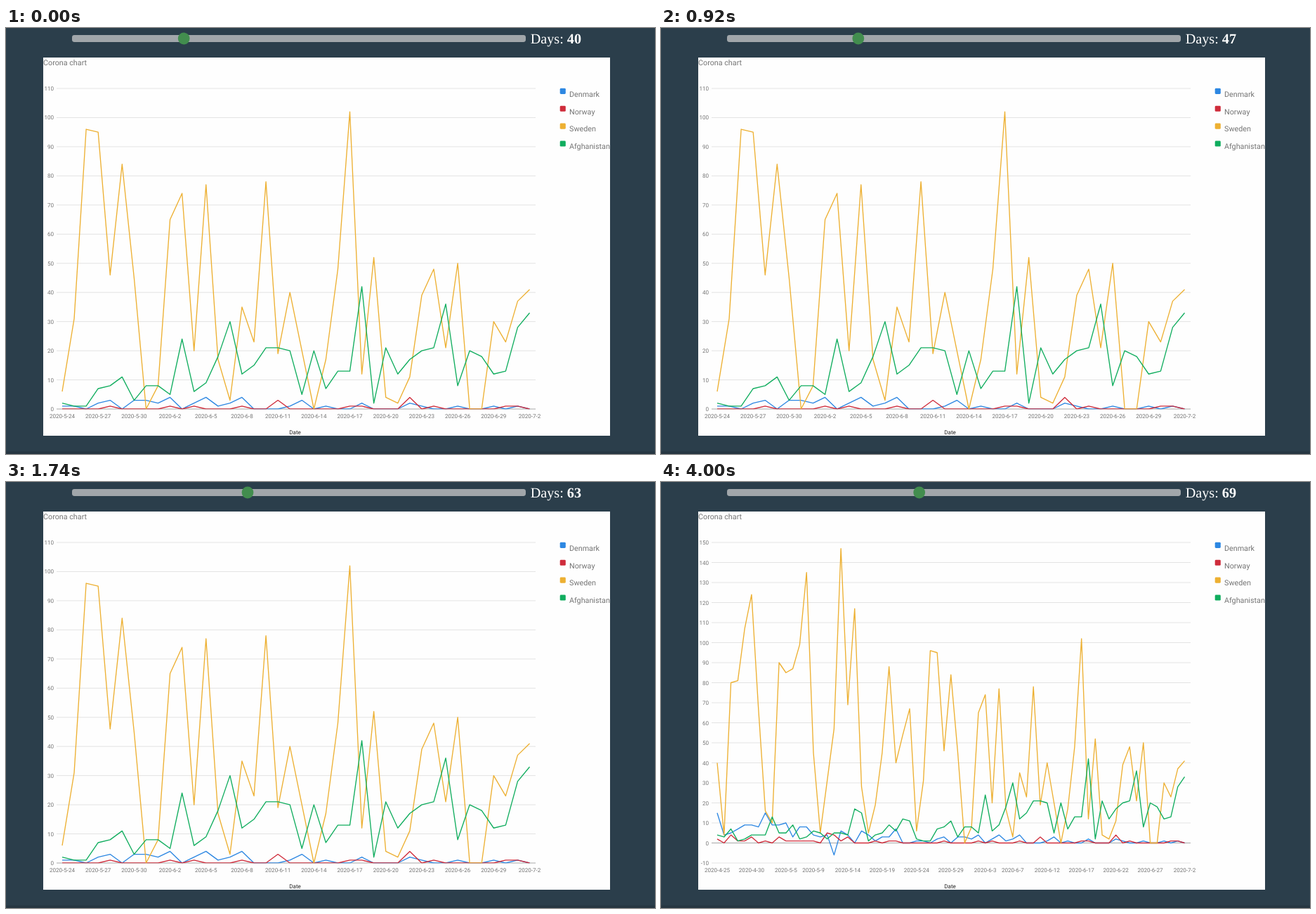
Animation, 924 px wide and 606 px high, one loop 8000 ms. Source, as an HTML page:

```html
<!DOCTYPE html>
<html lang="en">
<head>
<meta charset="utf-8">
<title>Days chart</title>
<style>
  html, body { margin: 0; width: 100%; height: 100%; overflow: hidden; background: #2b3e4b; }
  svg { display: block; width: 924px; height: 606px; }
  text { font-family: Roboto, sans-serif; fill: #757575; text-rendering: geometricPrecision; }
  .big { font-size: 10.76px; }
  .small { font-size: 8.07px; }
  .days { font: 20.2px "Liberation Serif", serif; fill: #fff; }
  .days tspan { font-weight: bold; }
  polyline { fill: none; stroke-width: 1.345; stroke-linejoin: round; }
</style>
</head>
<body>
<svg id="stage" viewBox="0 0 924 606">
  <clipPath id="plot"><rect x="72" y="80" width="682" height="462.3"/></clipPath>
  <clipPath id="panel"><rect x="53" y="42" width="807" height="538"/></clipPath>
  <rect y="602.5" width="924" height="3.5" fill="#263641"/>
  <g opacity=".7">
    <rect x="94" y="10" width="646" height="10" rx="3.4" fill="#d3d3d3"/>
    <circle id="thumb" cy="15" r="8.4" fill="#4caf50"/>
  </g>
  <text class="days" x="746.7" y="21.8">Days: <tspan id="count">40</tspan></text>
</svg>
<script>
const LEFT = 80, RIGHT = 745.5, TOP = 86, BOTTOM = 542;

// Daily values from 2020-4-25 to 2020-7-2
const denmark = [
  15, 4, 5, 7, 9, 9, 8, 15, 9, 9, 10, 3, 8, 8, 4, 3, 4, -6, 6, 4, 0, 6, 4, 1, 3, 3, 7, 0, 0,
  1, 1, 0, 2, 3, 0, 3, 3, 2, 4, 0, 2, 4, 1, 2, 4, 0, 0, 0, 1, 3,
  0, 1, 0, 0, 2, 0, 0, 0, 2, 1, 0, 0, 1, 0, 0, 1, 0, 1, 0];
const norway = [
  2, 0, 4, 1, 1, 3, 0, 1, 0, 3, 1, 1, 1, 1, 1, 0, 5, 4, 1, 3, 0, 0, 0, 1, 0, 1, 1, 0, 0,
  0, 0, 0, 0, 1, 0, 0, 0, 0, 1, 0, 1, 0, 0, 0, 1, 0, 0, 3, 0, 0,
  0, 0, 0, 1, 1, 0, 0, 0, 4, 0, 1, 0, 0, 0, 0, 0, 1, 1, 0];
const sweden = [
  40, 4, 80, 81, 107, 124, 67, 16, 10, 90, 85, 87, 99, 135, 45, 5, 31, 57, 147, 69, 117, 28, 5, 19, 45, 88, 40, 54, 67,
  6, 31, 96, 95, 46, 84, 45, 0, 8, 65, 74, 20, 77, 17, 3, 35, 23, 78, 19, 40, 20,
  0, 17, 48, 102, 12, 52, 4, 2, 11, 39, 48, 21, 50, 0, 0, 30, 23, 37, 41];
const afghanistan = [
  4, 3, 7, 1, 2, 4, 4, 4, 13, 5, 5, 9, 2, 3, 6, 5, 2, 5, 5, 4, 17, 15, 1, 4, 5, 9, 6, 12, 11,
  2, 1, 1, 7, 8, 11, 3, 8, 8, 5, 24, 6, 9, 18, 30, 12, 15, 21, 21, 20, 5,
  20, 7, 13, 13, 42, 2, 21, 12, 17, 20, 21, 36, 8, 20, 18, 12, 13, 28, 33];

const series = [
  ["Denmark", "#2d87e2", denmark],
  ["Norway", "#cf2c3b", norway],
  ["Sweden", "#edb032", sweden],
  ["Afghanistan", "#10ad5e", afghanistan]
];

function add(parent, tag, attrs, content) {
  const node = document.createElementNS("http://www.w3.org/2000/svg", tag);
  for (const key in attrs) node.setAttribute(key, attrs[key]);
  if (content !== undefined) node.textContent = content;
  return parent.appendChild(node);
}

function label(parent, x, y, content, size = "small", anchor = "start") {
  return add(parent, "text", { x, y, class: size, "text-anchor": anchor }, content);
}

function dateName(daysBack) {
  const d = new Date(Date.UTC(2020, 6, 2 - daysBack));
  return `${d.getUTCFullYear()}-${d.getUTCMonth() + 1}-${d.getUTCDate()}`;
}

function makeChart(days, min, max, ticks) {
  const chart = add(stage, "g", { "clip-path": "url(#panel)" });
  const xAt = i => LEFT + i * (RIGHT - LEFT) / (days - 1);
  const yAt = v => BOTTOM - (v - min) * (BOTTOM - TOP) / (max - min);
  add(chart, "rect", { x: 53, y: 42, width: 807, height: 538, fill: "#fefefe" });
  label(chart, 53, 53, "Corona chart", "big");

  for (let v = min; v <= max; v += 10) {
    const y = yAt(v);
    add(chart, "line", { x1: 72, x2: 754, y1: y, y2: y, stroke: v ? "#e0e0e0" : "#9e9e9e", "stroke-width": 0.9 });
    label(chart, 68, y + 3, v, "small", "end");
  }
  for (const i of ticks) label(chart, xAt(i), 555, dateName(days - 1 - i), "small", "middle");
  label(chart, 411.5, 577.6, "Date", "small", "middle").style.fill = "#222";

  const lines = add(chart, "g", { "clip-path": "url(#plot)" });
  series.forEach(([name, color, values], row) => {
    const points = values.slice(-days).map((v, i) => `${xAt(i)},${yAt(v)}`).join(" ");
    add(lines, "polyline", { points, stroke: color });
    const y = 85.8 + row * 24.9;
    add(chart, "rect", { x: 788.7, y, width: 8.1, height: 8.1, rx: 1.4, fill: color });
    label(chart, 802, y + 11.8, name, "big");
  });
  return chart;
}

const early = makeChart(40, 0, 110, Array.from({ length: 14 }, (_, i) => i * 3));
const late = makeChart(69, -10, 150, [0, 5, 10, 14, 19, 24, 29, 34, 39, 43, 48, 53, 58, 63, 68]);

// Slider drag: time in ms, day count
const drag = [
  [0, 40], [499, 40], [500, 42], [640, 43], [760, 44], [780, 45], [1160, 53], [1180, 54],
  [1440, 58], [1460, 59], [1740, 63], [1860, 64], [1880, 65], [2020, 66], [2180, 69], [8000, 69]
];

function daysAt(t) {
  const k = drag.findIndex(([time]) => time > t);
  const [t0, d0] = drag[k - 1], [t1, d1] = drag[k];
  return Math.floor(d0 + (d1 - d0) * (t - t0) / (t1 - t0) + 1e-6);
}

function draw(now) {
  const t = Math.max(0, now) % 8000;
  const days = daysAt(t);
  thumb.setAttribute("cx", 253.2 + (days - 40) * 3.948);
  count.textContent = days;
  early.style.display = t < 3400 ? "" : "none";
  late.style.display = t >= 4000 ? "" : "none";
}

const stage0 = performance.now();
function loop(now) {
  draw(now - stage0);
  requestAnimationFrame(loop);
}
draw(0);
requestAnimationFrame(loop);
</script>
</body>
</html>
```
